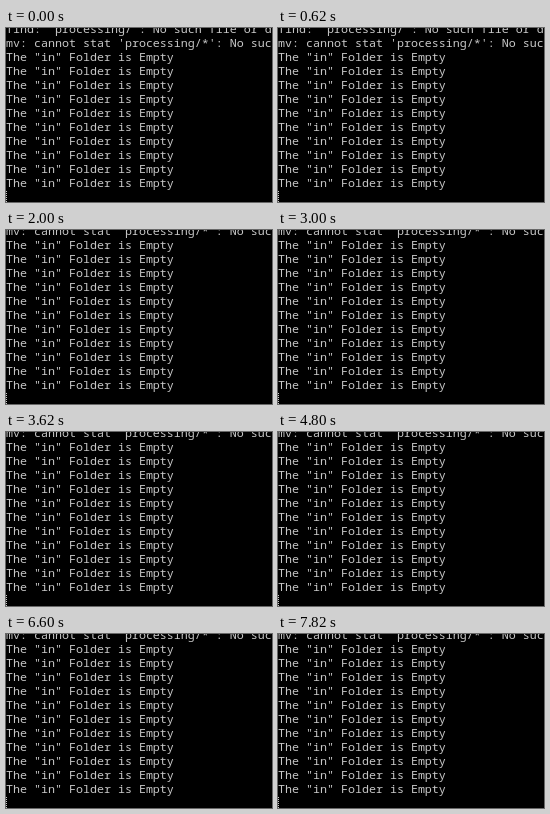
These frames come from a looping animation (266 by 174 pixels, 8000 ms). An HTML page:

```html
<!DOCTYPE html>
<html lang="en">
<head>
<meta charset="utf-8">
<title>Terminal</title>
<style>
  html, body { margin: 0; width: 100%; height: 100%; overflow: hidden; background: #000; }
  svg { display: block; width: 266px; height: 174px; }
  text { font: 11.667px "Noto Sans Mono", "DejaVu Sans Mono", monospace; fill: #c8c8c8; white-space: pre; }
</style>
</head>
<body>
<svg viewBox="0 0 266 174">
  <g id="log"></g>
  <path d="M.5 163V174" stroke="#c8c8c8" stroke-dasharray="1"/>
</svg>
<script>
const LOOP = 8000, SCROLL_AT = 2000;
const ROW = 14, FIRST_BASELINE = 5;
const log = document.getElementById('log');

const lines = [
  "find: 'processing/': No such file or directory",
  "mv: cannot stat 'processing/*': No such file or directory",
  ...Array(11).fill('The "in" Folder is Empty')
];

const rows = lines.map((line, i) => {
  const row = document.createElementNS('http://www.w3.org/2000/svg', 'text');
  row.setAttribute('y', FIRST_BASELINE + i * ROW);
  row.textContent = line;
  return log.appendChild(row);
});
const newest = rows[rows.length - 1];

function draw(time) {
  const scrolled = time % LOOP >= SCROLL_AT;
  log.setAttribute('transform', `translate(0 ${scrolled ? -ROW : 0})`);
  newest.setAttribute('visibility', scrolled ? 'visible' : 'hidden');
}

const start = performance.now();
function tick() {
  draw(performance.now() - start);
  requestAnimationFrame(tick);
}
tick();
</script>
</body>
</html>
```
